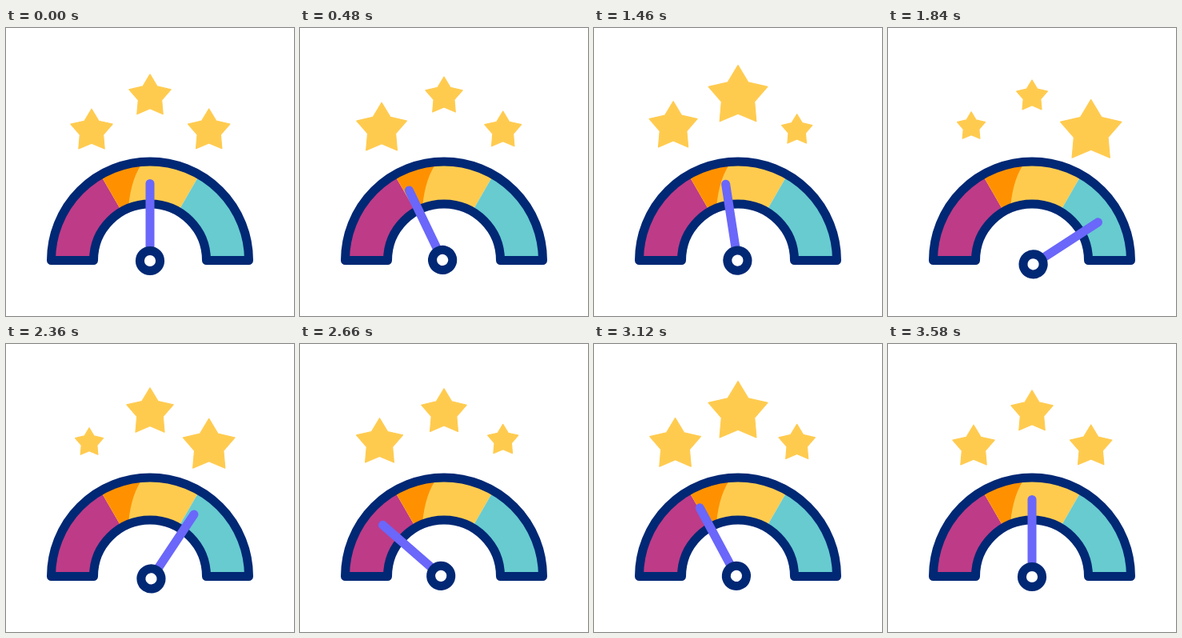
An HTML page with a canvas that plays this animation: 360 by 360 pixels, repeating every 3.6 s.

```html
<!DOCTYPE html>
<html lang="en">
<head>
<meta charset="utf-8">
<title>Rating gauge</title>
<style>
  html, body { margin: 0; width: 100%; height: 100%; overflow: hidden; background: #fff; }
  canvas { display: block; width: 100vmin; height: 100vmin; margin: 0 auto; }
</style>
</head>
<body>
<canvas id="stage"></canvas>
<script>
const LOOP = 3600, STEP = 20, SIZE = 360;
const NAVY = '#002874', YELLOW = '#ffcb4f';
const RAD = Math.PI / 180;
const CX = 180, BASE = 290.5, HUB = 291;

const canvas = document.getElementById('stage');
const ctx = canvas.getContext('2d');
const ratio = window.devicePixelRatio || 1;
canvas.width = canvas.height = Math.round(Math.min(innerWidth, innerHeight) * ratio) || SIZE;

// Eased 0 to 1 between two times.
function ramp(t, from, to) {
  const u = Math.min(1, Math.max(0, (t - from) / (to - from)));
  return u * u * (3 - 2 * u);
}

// Eased rise and fall.
const pulse = (t, from, peak, to) => ramp(t, from, peak) - ramp(t, peak, to);

function star(x, y, scale) {
  const R = 27.5 * scale;
  ctx.beginPath();
  for (let i = 0; i < 10; i++) {
    const r = i % 2 ? R * .56 : R, a = i * 36 * RAD;
    ctx.lineTo(x + r * Math.sin(a), y - r * Math.cos(a));
  }
  ctx.closePath();
  ctx.fillStyle = ctx.strokeStyle = YELLOW;
  ctx.lineWidth = 1.2;
  ctx.fill();
  ctx.stroke();
}

function stars(t, out, back, home) {
  const left = 1 + .44 * out - .77 * ramp(t, 1200, 1820)
    + .77 * ramp(t, 2540, 2760) - .44 * home;
  const mid = 1 - .26 * out + .68 * (pulse(t, 1200, 1480, 1820) + pulse(t, 2200, 2500, 2820))
    + 1.42 * ramp(t, 2820, 3440) - 1.16 * ramp(t, 3440, 3580);
  const right = 1 - .27 * out + .73 * ramp(t, 1510, 1840)
    - .73 * ramp(t, 2200, 2640) + .27 * home;

  const rest = 1 - out + home;
  star(111 - 10.4 * left + 6.4 * rest, 123.3 + 5.4 * rest, left);
  star(180, 85.4, mid);
  star(253.7, 125.8 + 2.7 * right - 8 * (back - home), right);
}

function band(from, to, color) {
  ctx.beginPath();
  ctx.arc(CX, BASE, 123, (from - 90) * RAD, (to - 90) * RAD);
  ctx.arc(CX, BASE, 71, (to - 90) * RAD, (from - 90) * RAD, true);
  ctx.closePath();
  ctx.fillStyle = color;
  ctx.fill();
}

function gauge() {
  band(-90, -30, '#be3b87');
  band(-30, 30, YELLOW);
  band(30, 90, '#67cbd0');

  // orange shade with a curved right edge
  ctx.save();
  ctx.beginPath();
  ctx.moveTo(172.5, 166);
  ctx.quadraticCurveTo(156.5, 186, 153, 224);
  ctx.lineTo(100, 260);
  ctx.lineTo(100, 150);
  ctx.closePath();
  ctx.clip();
  band(-30, 0, '#ff9100');
  ctx.restore();

  ctx.beginPath();
  ctx.arc(CX, BASE, 123.5, Math.PI, 0);
  ctx.arc(CX, BASE, 70.5, 0, Math.PI, true);
  ctx.closePath();
  ctx.strokeStyle = NAVY;
  ctx.lineWidth = 11;
  ctx.stroke();
}

// The pivot sits slightly off the hub's centre.
function needle(angle) {
  const px = 176.8, py = 294.6;
  ctx.save();
  ctx.translate(px, py);
  ctx.rotate(angle * RAD);
  ctx.translate(-px, -py);
  ctx.beginPath();
  ctx.moveTo(CX, HUB - 12);
  ctx.lineTo(CX, 194.5);
  ctx.strokeStyle = '#6a67fa';
  ctx.lineWidth = 11;
  ctx.stroke();
  ctx.beginPath();
  ctx.arc(CX, HUB, 12.6, 0, 2 * Math.PI);
  ctx.fillStyle = '#fff';
  ctx.fill();
  ctx.strokeStyle = NAVY;
  ctx.stroke();
  ctx.restore();
}

function draw(t) {
  const k = canvas.width / SIZE;
  ctx.setTransform(k, 0, 0, k, 0, 0);
  ctx.fillStyle = '#fff';
  ctx.fillRect(0, 0, SIZE, SIZE);
  ctx.lineCap = ctx.lineJoin = 'round';

  const out = ramp(t, 200, 800);
  const across = ramp(t, 1200, 1780);
  const back = ramp(t, 2200, 2750);
  const home = ramp(t, 2750, 3485);

  stars(t, out, back, home);
  gauge();
  needle(57 * (2 * across - out - 2 * back + home));
}

const start = performance.now();
function tick() {
  const t = (performance.now() - start) % LOOP;
  draw(Math.floor(t / STEP) * STEP);
  requestAnimationFrame(tick);
}
tick();
</script>
</body>
</html>
```
